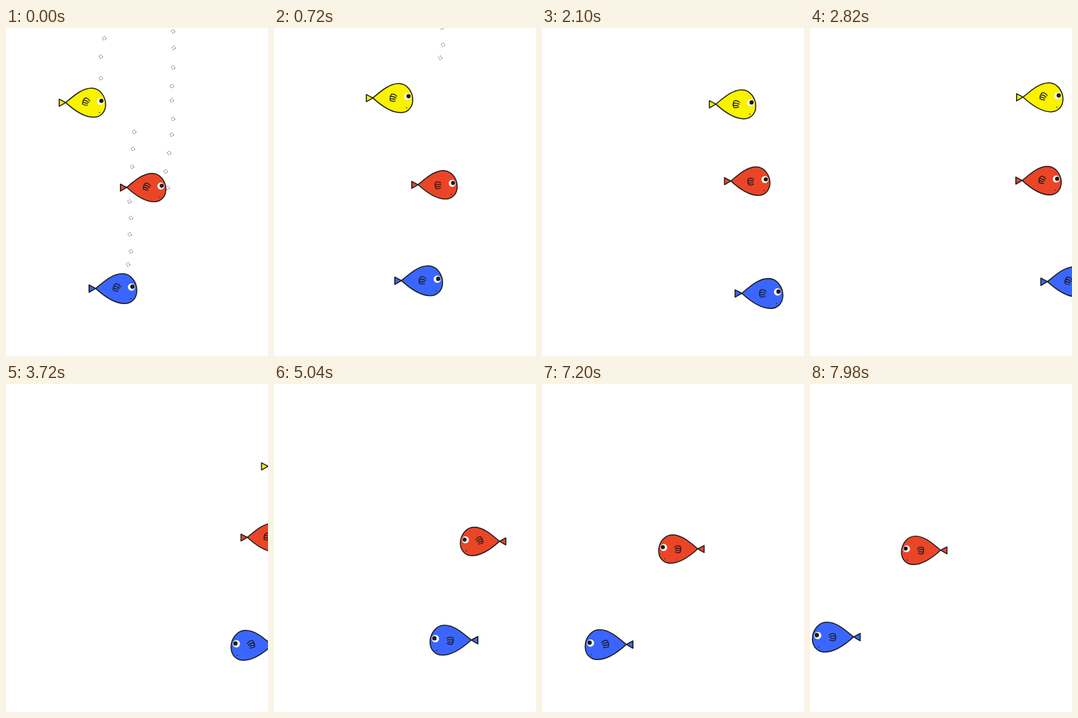
Write an HTML page with a canvas that moves like this. It is 384x480 px and loops after 8 s.

```html
<!DOCTYPE html>
<html lang="en">
<head>
<meta charset="utf-8">
<title>Three fish</title>
<style>
  html, body { margin: 0; width: 100%; height: 100%; overflow: hidden; background: #fff; }
  canvas { display: block; width: 100vw; height: 100vh; }
</style>
</head>
<body>
<canvas width="384" height="480"></canvas>
<script>
const LOOP = 8000, STEP = 60;
const ctx = document.querySelector('canvas').getContext('2d');

// Fish paths start where body and tail meet; the fish faces right.
const body = new Path2D('M0 0C12 -10 24 -21 38 -21C50 -21 58.5 -9 58.5 3C58.5 14 51 21.5 41 21.5C28 21.5 12 11 0 0Z');
const tail = new Path2D('M0 0L-9.5 -5V5.5Z');
const fin = new Path2D('M5 -2Q1 -6 -3 -4.5Q-6 0 -4 5Q-1 6 3 5M-4 -1Q0 -2 4 0.5M-4.5 2L2.5 2.5');

// x and speed describe the swim to the right, backX the place at 5040 ms on the way back.
const school = [
  { color: '#3a66ff', size: 1.03, x: 131.5, speed: .0768, turn: 3360, backX: 289, backSpeed: .0766,
    y: 380, bob: 10.6, period: 2400, peak: 1840, finPeriod: 920,
    bubbles: [[188, 152], [186, 177], [185, 203], [185, 228], [181, 254], [183, 278], [181.5, 302], [183, 327], [179, 346]] },
  { color: '#f9f200', size: 1, x: 87.5, speed: .0797, turn: Infinity,
    y: 110.4, bob: 10, period: 2180, peak: 1590, finPeriod: 920,
    bubbles: [[144, 15], [139, 42], [139, 73.5]] },
  { color: '#eb4528', size: .98, x: 177, speed: .0475, turn: 3840, backX: 330.5, backSpeed: .0473,
    y: 233.3, bob: 10.2, period: 11200, peak: 8400, finPeriod: 460,
    bubbles: [[245, 5], [246, 29], [245, 58], [243, 85], [243, 106], [245, 133], [243, 156], [239, 183], [234, 210], [237, 234]] }
];

function circle(x, y, r) {
  ctx.beginPath();
  ctx.arc(x, y, r, 0, 2 * Math.PI);
}

function wave(t, period, peak = 0) {
  return Math.cos(2 * Math.PI * (t - peak) / period);
}

function drawFish(fish, t) {
  const back = t >= fish.turn;
  const x = back ? fish.backX - fish.backSpeed * (t - 5040) : fish.x + fish.speed * t;
  const y = fish.y + fish.bob * wave(t, fish.period, fish.peak);
  ctx.save();
  ctx.translate(x, y);
  ctx.scale(back ? -fish.size : fish.size, fish.size);
  ctx.lineJoin = ctx.lineCap = 'round';
  ctx.lineWidth = 1.5;
  ctx.strokeStyle = '#1c1c1c';
  ctx.fillStyle = fish.color;
  for (const part of [tail, body]) {
    ctx.fill(part);
    ctx.stroke(part);
  }

  ctx.fillStyle = '#fff';
  circle(51, -2, 5.2);
  ctx.fill();
  ctx.fillStyle = '#1c1c1c';
  circle(52.3, -2.5, 3.1);
  ctx.fill();
  circle(49.5, 14.5, .8);
  ctx.fill();

  ctx.translate(30, -.5 - wave(t, fish.finPeriod));
  ctx.rotate(.25 * wave(t, fish.finPeriod));
  ctx.lineWidth = 1.3;
  ctx.stroke(fin);
  ctx.restore();
}

// Bubbles rise quickly while drifting along with their fish.
function drawBubbles(fish, t) {
  ctx.save();
  ctx.strokeStyle = '#555';
  ctx.lineWidth = .9;
  ctx.setLineDash([2.2, 1.4]);
  for (const [x, y] of fish.bubbles) {
    circle(x + (fish.speed + .013) * t, y - .42 * t, 2.5);
    ctx.stroke();
  }
  ctx.restore();
}

function frame(now) {
  const t = Math.floor(now % LOOP / STEP) * STEP;
  ctx.clearRect(0, 0, 384, 480);
  for (const fish of school) {
    drawFish(fish, t);
    drawBubbles(fish, t);
  }
  requestAnimationFrame(() => frame(performance.now() - start));
}

const start = performance.now();
frame(0);
</script>
</body>
</html>
```
